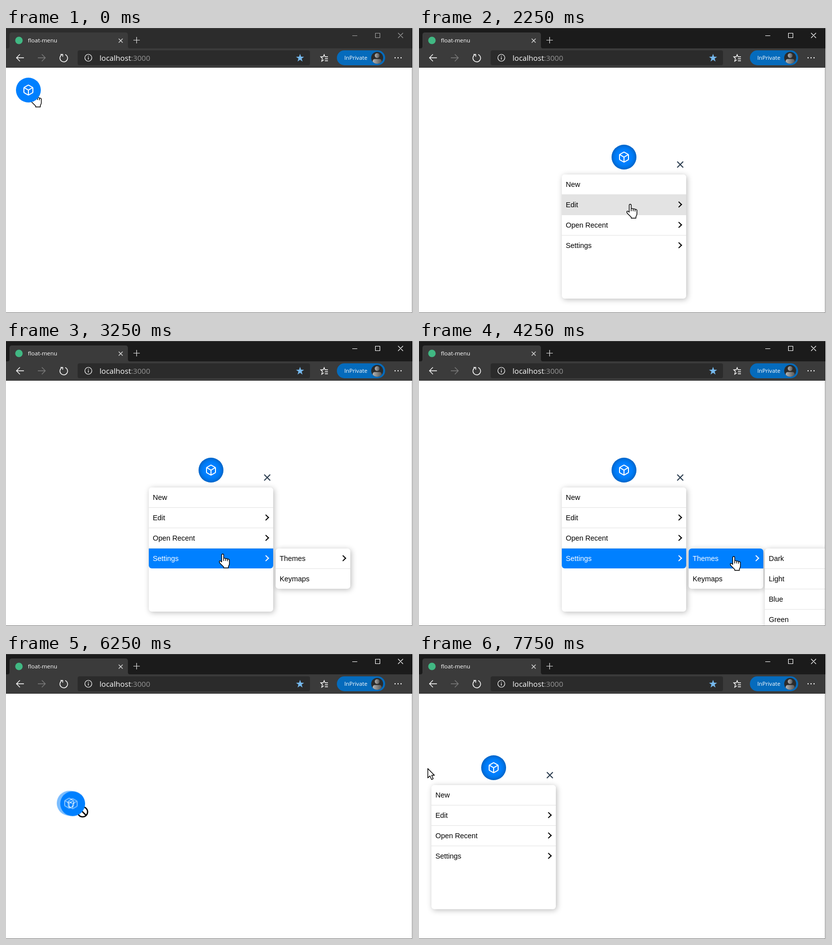
Animation of 818x574 px, one loop 8 s. Source, as an HTML page:

```html
<!DOCTYPE html>
<html lang="en">
<head>
<meta charset="utf-8">
<title>float-menu</title>
<style>
html, body { margin: 0; width: 100%; height: 100%; overflow: hidden; background: #fff; }
.stage { position: relative; width: 818px; height: 574px; overflow: hidden; background: #fff; }
.stage > * { position: absolute; left: 0; top: 0; }
.chrome { font-family: "Open Sans", "Noto Sans", sans-serif; fill: none; stroke-linecap: butt; }
.chrome text { fill: #fff; stroke: none; }
.app { width: 816px; height: 573px; overflow: hidden; font: 14.4px "Liberation Sans", Arial, sans-serif; color: #000; }
.app > * { position: absolute; left: 0; top: 0; }
.anim, .anim * { animation-duration: 8s; animation-timing-function: step-end; animation-iteration-count: infinite; }

/* Draggable button, positioned by its centre */
.head { width: 0; height: 0; animation-name: head; z-index: 1; }
.disc { position: absolute; left: -25px; top: -25px; width: 50px; height: 50px; border-radius: 50%; background: #0080ff; }
.disc svg { position: absolute; left: 13px; top: 13px; }
.shade { position: absolute; inset: 0; border-radius: 50%; box-shadow: inset 0 0 11px rgba(0, 0, 0, .42); animation-name: open; }
.ghost { transform: translate(-7px, -1px); animation-name: ghost; }

/* Menus */
.float { animation-name: open, place; }
.menu { position: absolute; background: #fff; border-radius: 6px; box-shadow: 2px 2px 12px rgba(0, 0, 0, .27); }
.rows { overflow: hidden; border-radius: inherit; }
.row { position: relative; height: 40px; line-height: 40px; padding-left: 8px; border-bottom: 1px solid #e3e3e3; white-space: nowrap; }
.row:last-child { border-bottom: 0; }
.more::after { content: ""; position: absolute; right: 9.6px; top: 14.8px; box-sizing: border-box; width: 9px; height: 9px;
  border: solid currentColor; border-width: 2px 2px 0 0; transform: rotate(45deg); }
.main { width: 250px; height: 250px; }
.sub { left: 255px; top: 123px; width: 150px; animation-name: sub; }
.leaf { left: 408px; top: 123px; width: 150px; animation-name: leaf; }
.close { position: absolute; left: 231px; top: -27px; }
.new { animation-name: new; }
.edit { animation-name: edit; }
.recent { animation-name: recent; }
.settings { animation-name: settings; }
.themes { animation-name: themes; }
.light { animation-name: light; }

.cursor { overflow: visible; animation-name: cursor; }
.hand { animation-name: hand; }
.block { animation-name: block; }
.arrow { animation-name: arrow; }
.bar { animation-name: bar; }
.title { animation-name: title; }

@keyframes bar { 0% { fill: #2c2c2c } 3.125%, to { fill: #1b1b1b } }
@keyframes title { 0% { opacity: .55 } 3.125%, to { opacity: 1 } }
@keyframes head {
  0% { transform: translate(45px, 125px) }
  3.125% { transform: translate(236px, 195px) }
  6.25% { transform: translate(424px, 266px) }
  12.5% { transform: translate(416px, 260px) }
  15.625% { transform: translate(412px, 260px) }
  71.875% { transform: translate(406px, 262px) }
  75% { transform: translate(270px, 286px) }
  78.125% { transform: translate(134px, 301.5px) }
  81.25% { transform: translate(52px, 266px) }
  84.375%, 87.5% { transform: translate(25px, 229px) }
  90.625%, to { transform: translate(150px, 229px) }
}
@keyframes ghost { 0% { opacity: 0 } 75% { opacity: .52 } 84.375%, to { opacity: 0 } }
@keyframes open { 0% { opacity: 0 } 18.75% { opacity: 1 } 65.625% { opacity: 0 } 90.625%, to { opacity: 1 } }
@keyframes place { 0% { transform: translate(287px, 295px) } 90.625%, to { transform: translate(25px, 264px) } }
@keyframes sub { 0% { opacity: 0 } 40.625% { opacity: 1 } 65.625%, to { opacity: 0 } }
@keyframes leaf { 0% { opacity: 0 } 53.125% { opacity: 1 } 65.625%, to { opacity: 0 } }
@keyframes new { 0% { background: #fff } 25% { background: #e3e3e3 } 28.125%, to { background: #fff } }
@keyframes edit { 0% { background: #fff } 28.125% { background: #e3e3e3 } 31.25%, to { background: #fff } }
@keyframes recent { 0% { background: #fff } 31.25% { background: #e3e3e3 } 37.5%, to { background: #fff } }
@keyframes settings {
  0% { background: #fff; color: #000 }
  37.5% { background: #e3e3e3; color: #000 }
  40.625% { background: #0080ff; color: #fff }
  65.625%, to { background: #fff; color: #000 }
}
@keyframes themes {
  0% { background: #fff; color: #000 }
  50% { background: #e3e3e3; color: #000 }
  53.125% { background: #0080ff; color: #fff }
  65.625%, to { background: #fff; color: #000 }
}
@keyframes light { 0% { background: #fff } 59.375% { background: #e3e3e3 } 65.625%, to { background: #fff } }
@keyframes cursor {
  0% { transform: translate(50px, 130px) }
  3.125% { transform: translate(260px, 213px) }
  6.25% { transform: translate(448px, 284px) }
  12.5% { transform: translate(440px, 278px) }
  15.625% { transform: translate(426px, 267px) }
  21.875% { transform: translate(424px, 276px) }
  25% { transform: translate(420px, 312px) }
  28.125% { transform: translate(417px, 354px) }
  31.25% { transform: translate(421px, 383px) }
  34.375% { transform: translate(424px, 393px) }
  37.5% { transform: translate(427px, 424px) }
  40.625% { transform: translate(428px, 428px) }
  46.875% { transform: translate(505px, 430px) }
  50% { transform: translate(610px, 432px) }
  53.125% { transform: translate(625px, 433px) }
  59.375% { transform: translate(715px, 465px) }
  62.5% { transform: translate(734px, 471px) }
  65.625% { transform: translate(640px, 400px) }
  68.75% { transform: translate(420px, 268px) }
  71.875% { transform: translate(427px, 279px) }
  75% { transform: translate(290px, 303px) }
  78.125% { transform: translate(154px, 318px) }
  81.25% { transform: translate(72px, 283px) }
  84.375% { transform: translate(32px, 235px) }
  87.5% { transform: translate(28px, 234px) }
  90.625% { transform: translate(35px, 235px) }
  93.75% { transform: translate(25px, 232px) }
  96.875%, to { transform: translate(17px, 230px) }
}
@keyframes hand {
  0% { opacity: 1 } 3.125% { opacity: 0 } 15.625% { opacity: 1 }
  71.875% { opacity: 0 } 84.375% { opacity: 1 } 90.625%, to { opacity: 0 }
}
@keyframes block { 0% { opacity: 0 } 3.125% { opacity: 1 } 15.625% { opacity: 0 } 71.875% { opacity: 1 } 84.375%, to { opacity: 0 } }
@keyframes arrow { 0% { opacity: 0 } 90.625%, to { opacity: 1 } }
</style>
</head>
<body>
<div class="stage anim">
  <svg class="chrome" width="818" height="574">
    <defs>
      <linearGradient id="skin" x2="1" y2="0"><stop stop-color="#b5b5b5"/><stop offset="1" stop-color="#555"/></linearGradient>
      <clipPath id="round"><circle cx="746" cy="60" r="12"/></clipPath>
      <symbol id="box" viewBox="0 0 24 24">
        <path fill="none" stroke="#fff" stroke-width="2" stroke-linecap="round" stroke-linejoin="round"
          d="M21 16V8a2 2 0 0 0-1-1.73l-7-4a2 2 0 0 0-2 0l-7 4A2 2 0 0 0 3 8v8a2 2 0 0 0 1 1.73l7 4a2 2 0 0 0 2 0l7-4A2 2 0 0 0 21 16zM3.27 6.96 12 12.01l8.73-5.05M12 22.08V12"/>
      </symbol>
    </defs>
    <rect class="bar" width="817" height="41"/>
    <path d="M0 .5H817" stroke="#454545"/>
    <path d="M3 41q4 0 4-4V14q0-5 5-5H240q5 0 5 5V37q0 4 4 4H817V80H0V41z" fill="#3b3b3b"/>
    <path d="M816.5 80V573.5H0" stroke="#6e6e6e"/>

    <circle cx="26" cy="25" r="7.5" fill="#41b883"/>
    <g class="title">
      <path d="M696 15.5H706M742.5 10.5h9v9h-9zM788 10l10 10m0-10-10 10" stroke="#fff" stroke-width="1.1"/>
    </g>
    <text x="44" y="29" font-size="11.5">float-menu</text>
    <path d="M226.5 21.5l8 8m0-8-8 8M256 24.5h13M262.5 18v13" stroke="#ddd" stroke-width="1.2"/>

    <path d="M36 60H21m7-7-7 7 7 7" stroke="#fff" stroke-width="1.3"/>
    <path d="M64 60h15m-7-7 7 7-7 7" stroke="#7c7c7c" stroke-width="1.3"/>
    <path d="M119 53.4a7.7 7.7 0 1 1-6.5.3M109.500 53.300h4.500v4.500" stroke="#fff" stroke-width="1.4"/>
    <rect x="144" y="45" width="467" height="30" rx="4" fill="#2b2b2b"/>
    <circle cx="165.500" cy="60" r="7" stroke="#fff" stroke-width="1.2"/>
    <path d="M165.500 59v4.500M165.500 56v1.500" stroke="#fff" stroke-width="1.3"/>
    <text x="188" y="66" font-size="15.1">localhost<tspan fill="#959595">:3000</tspan></text>
    <path id="star" transform="translate(591 60.500)" fill="#76b9ed" d="M0-8.500 2-2.750 8.100-2.600 3.200 1.050 5 6.900 0 3.400-5 6.900-3.200 1.050-8.100-2.600-2-2.750z"/>
    <path d="M641 58 639.500 53.500 637.500 58H632.500L636 61.500 634.500 67 639 64M641 58H647M641 62H647M641 66H647" stroke="#fff" stroke-width="1.3"/>

    <rect x="665" y="45" width="97" height="30" rx="15" fill="#056bbc"/>
    <text x="680" y="64" font-size="11.2">InPrivate</text>
    <circle cx="746" cy="60" r="12" fill="#2b2b2b"/>
    <g clip-path="url(#round)" fill="url(#skin)">
      <circle cx="746" cy="55.500" r="4.800"/>
      <path d="M737 73v-6q0-4.500 4.500-4.500h9q4.500 0 4.500 4.500v6z"/>
    </g>
    <g fill="#fff"><circle cx="782" cy="60" r="1.200"/><circle cx="788" cy="60" r="1.200"/><circle cx="794" cy="60" r="1.200"/></g>
  </svg>

  <div class="app">
    <div class="head">
      <div class="disc"><div class="shade"></div><svg width="24" height="24"><use href="#box"/></svg></div>
      <div class="disc ghost"><svg width="24" height="24"><use href="#box"/></svg></div>
    </div>
    <div class="float">
      <svg class="close" width="14" height="14"><path d="M1 1 13 13M13 1 1 13" stroke="#2c3e50" stroke-width="2"/></svg>
      <div class="menu main"><div class="rows">
        <div class="row new">New</div>
        <div class="row more edit">Edit</div>
        <div class="row more recent">Open Recent</div>
        <div class="row more settings">Settings</div>
      </div></div>
      <div class="menu sub"><div class="rows">
        <div class="row more themes">Themes</div>
        <div class="row">Keymaps</div>
      </div></div>
      <div class="menu leaf"><div class="rows">
        <div class="row">Dark</div>
        <div class="row light">Light</div>
        <div class="row">Blue</div>
        <div class="row">Green</div>
      </div></div>
    </div>
  </div>

  <svg class="cursor" width="1" height="1" fill="#fff" stroke="#000" stroke-width="1.4" stroke-linejoin="round">
    <path class="hand" d="M5.500 3q0-2 2-2t2 2v7q2-1.500 4 .5 2-1 3.800.800 2.700-.6 3.700 1.700v7q0 3-2 6v3H9.500v-2L2 19.500Q-.5 16 1.500 15q2-.5 4 2zM9.500 10v5M13.500 10.500V15M17.300 11.500V15.500"/>
    <g class="block" fill="none">
      <path d="M-7-7 7 7" stroke="#fff" stroke-width="5"/>
      <circle r="10" stroke="#fff" stroke-width="5"/>
      <circle r="10" stroke-width="2.500"/>
      <path d="M-7-7 7 7" stroke-width="2.500"/>
    </g>
    <path class="arrow" d="M.7.7V19.500L5 15.500 8.200 22.800 11.500 21.300 8.500 14.300H14z"/>
  </svg>
</div>
</body>
</html>
```
